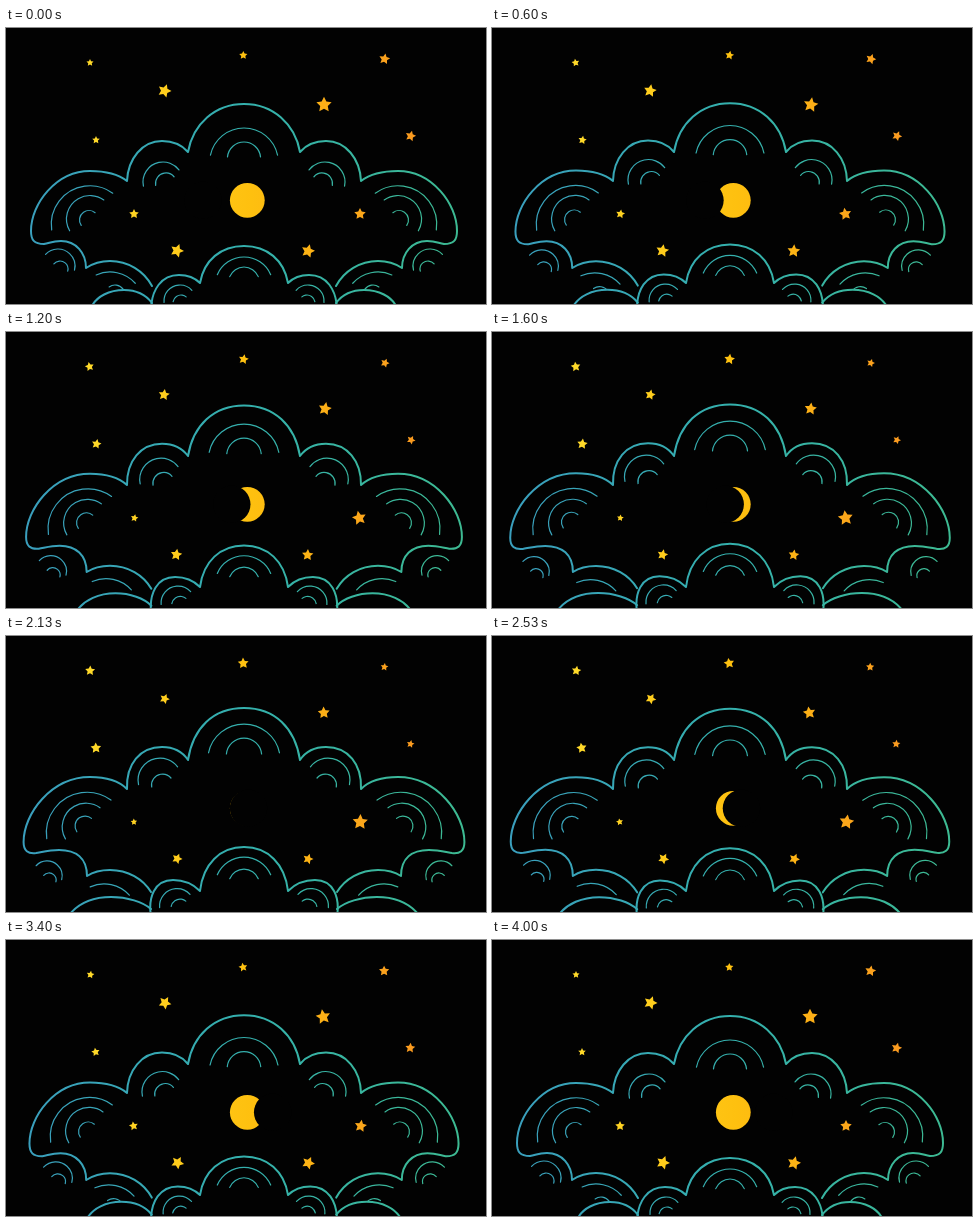
An HTML page with a canvas that plays this animation: 480 by 276 pixels, repeating every 4070 ms.

```html
<!DOCTYPE html>
<html lang="en">
<head>
<meta charset="utf-8">
<title>Moon over clouds</title>
<style>
html, body { margin: 0; height: 100%; overflow: hidden; background: #020202; }
canvas { display: block; width: 100vw; height: 100vh; }
</style>
</head>
<body>
<canvas width="480" height="276"></canvas>
<script>
const ctx = document.querySelector('canvas').getContext('2d');
const LOOP = 4070, FPS = 15, LAST = 60, BG = '#020202';
const MIRROR = new DOMMatrix([-1, 0, 0, 1, 476, 0]);
const rad = deg => deg * Math.PI / 180;

// Left halves of the outlines, at rest and swollen
const MAIN = [
  `M238,76 C209,76 187,96 182,124 C176,117 167,113 156,113 C136,113 122,131 121,153
   C112,146 99,143 84,143 C50,143 25,176 25,203 C25,212 28,216 38,216
   C44,215 46,213 55,213 C70,213 80,225 80,240 C86,236 95,233 104,233 C122,233 138,243 146,258`,
  `M238,72 C207,72 187,92 182,124 C176,115 167,111 156,111 C134,111 120,128 121,153
   C112,144 99,141 84,141 C45,141 17.5,178 17.5,206 C17.5,215 22,218 30,217
   C36,216 44,214 53,214 C70,214 81,222 81,240 C87,236 95,234 104,234 C122,234 137,243 145,256`];
const FRONT = [
  'M145,280 C146,262 155,247 173,247 C181,247 189,250 194,255 C198,232 215,218 238,218',
  'M145,280 C142,262 148,244 167,244 C178,244 187,248 194,255 C197,228 214,211 238,211'];
const LOW = [
  'M85,280 C90,268 104,262 118,262 C130,262 140,267 146,275',
  'M62,280 C72,267 88,261 105,261 C121,261 137,266 145,273'];

// Inner arcs: x, y, radius, start and end degrees, then growth of x, y, radius
const ARCS = [
  [238, 134.3, 34.3, 192, 270, 0, -10.1, 2],
  [238, 130.6, 16.6, 186, 270, 0, -10.9, 1.1],
  [157, 154, 20, 168, 323, -3, -10, 2],
  [160, 155.5, 10.5, 170, 320, -3.5, -6.5, .5],
  [84, 196.5, 38.7, 172, 306, -3, .5, 2],
  [84, 191, 23.5, 150, 306, -4, 0, .3],
  [83, 192, 9.5, 145, 310, -4, -2, .5],
  [52, 238, 17, 223, 374, -11, 2, -2],
  [54, 241, 8, 220, 375, -11, 3, -1],
  [104, 278, 34, 246, 318, -6, 4, 0],
  [109, 267, 10, 234, 328, -7, 9, 1],
  [174, 273, 16, 175, 318, -3, -3, 1.5],
  [175, 275, 8, 190, 310, -1, -3, 1],
  [238, 258, 29, 203, 270, 0, -8, 0],
  [238, 254.4, 15.4, 202, 270, 0, -6, 0]
];

// Stars: x, y, radius at rest, radius swollen, tilt, sway
const STARS = [
  [84, 34.7, 3.7, 5.2, 0, -.5], [158.5, 62.8, 7, 5.2, 20, -.5],
  [237.3, 27.3, 4.3, 5.7, 0, .3], [378.5, 31, 5.7, 4, 10, .5],
  [318, 76.8, 8, 6.2, 0, 1], [404.6, 108, 5.5, 4, 15, .5],
  [90, 112, 4, 5.6, 0, .5], [128, 186, 5, 3.4, 0, .5],
  [354, 186, 6, 8, 0, -.8], [171, 222.7, 7, 5.4, 20, -.7],
  [302, 223, 7, 5.4, 15, -.4]
];

function ramp(x0, x1, ...colors) {
  const g = ctx.createLinearGradient(x0, 0, x1, 0);
  colors.forEach((c, i) => g.addColorStop(i / (colors.length - 1), c));
  return g;
}
const TEAL = ramp(20, 456, '#3a9fbd', '#34b0ad', '#3dba92');
const GOLD = ramp(80, 410, '#ffda2a', '#fec00f', '#fa9a20');

function morph([rest, swollen], p) {
  const to = swollen.match(/[\d.]+/g);
  let i = 0;
  return new Path2D(rest.replace(/[\d.]+/g, n => +n + (to[i++] - n) * p));
}

function strokeBoth(half, width, fill) {
  const both = new Path2D(half);
  both.addPath(half, MIRROR);
  if (fill) { ctx.fillStyle = BG; ctx.fill(both); }
  ctx.lineWidth = width;
  ctx.stroke(both);
}

function clouds(p) {
  ctx.strokeStyle = TEAL;
  ctx.lineCap = ctx.lineJoin = 'round';
  for (const [x, y, r, from, to, dx, dy, dr] of ARCS) {
    const arc = new Path2D();
    arc.arc(x + dx * p, y + dy * p, r + dr * p, rad(from), rad(to));
    strokeBoth(arc, 1.2);
  }
  strokeBoth(morph(LOW, p), 2, true);
  strokeBoth(morph(MAIN, p), 2);
  strokeBoth(morph(FRONT, p), 2);
}

function disc(x, r, color) {
  ctx.fillStyle = color;
  ctx.beginPath();
  ctx.arc(x, 172.3, r, 0, 7);
  ctx.fill();
}

function moon(ms) {
  const u = ms - 2065;
  disc(241.3, 17.4, GOLD);
  disc(241.3 + u * (.0172 + 1e-9 * u * u), 18.7, BG);
}

function star([x, y, r0, r1, tilt, sway], p, s) {
  const r = r0 + (r1 - r0) * p, turn = rad(tilt + Math.sign(sway) * 12 * s - 90);
  ctx.fillStyle = GOLD;
  ctx.beginPath();
  for (let i = 0; i < 10; i++) {
    const a = turn + i * Math.PI / 5, d = i % 2 ? r * .5 : r;
    ctx.lineTo(x + sway * s + d * Math.cos(a), y + d * Math.sin(a));
  }
  ctx.fill();
}

function draw(now) {
  const step = Math.min(LAST, Math.floor((now % LOOP + 4) * FPS / 1000));
  const a = 2 * Math.PI * step / LAST, p = (1 - Math.cos(a)) / 2;
  ctx.fillStyle = BG;
  ctx.fillRect(0, 0, 480, 276);
  moon(step * 1000 / FPS);
  clouds(p);
  STARS.forEach(s => star(s, p, Math.sin(a)));
}

const start = performance.now();
function tick() {
  draw(performance.now() - start);
  requestAnimationFrame(tick);
}
tick();
</script>
</body>
</html>
```
